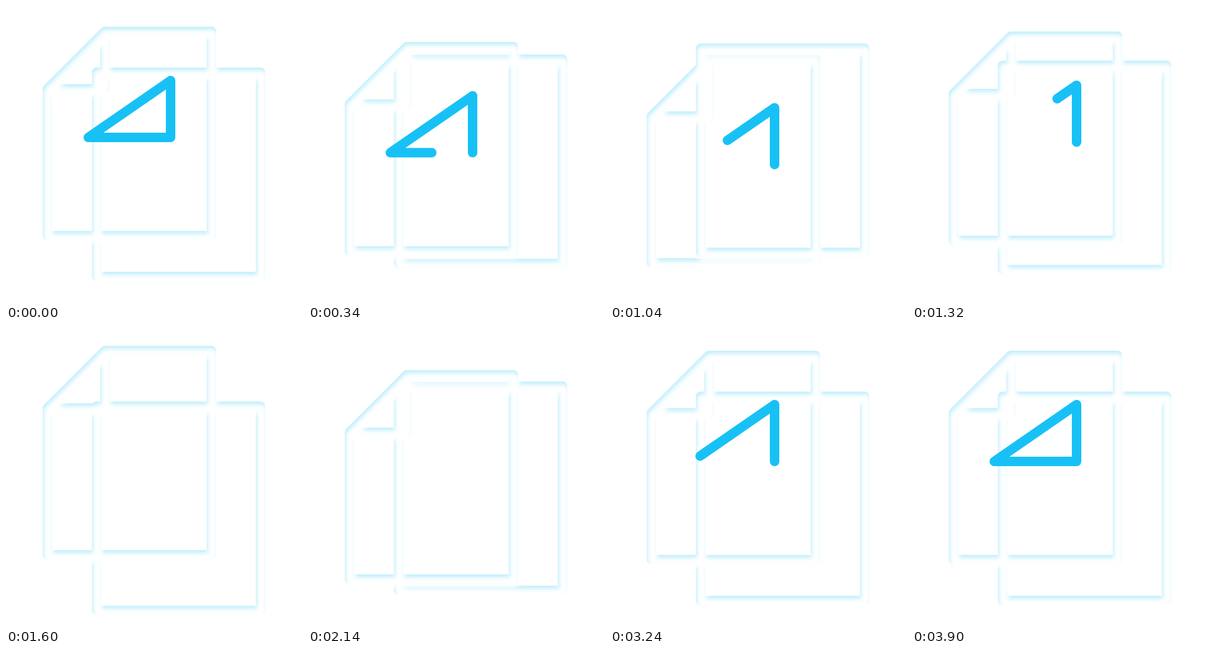
Animation of 500x500 px, one loop 4 s. Source, as an HTML page:

```html
<!DOCTYPE html>
<html lang="en">
<head>
<meta charset="utf-8">
<title>Pages</title>
<style>
  html, body { margin: 0; width: 100%; height: 100%; overflow: hidden; background: #fff; }
  svg { display: block; width: 100%; height: 100%; }
  path { fill: none; stroke-width: 16; stroke-linecap: round; stroke-linejoin: round; }
</style>
</head>
<body>
<svg viewBox="0 0 500 500">
  <defs>
    <filter id="inset" filterUnits="userSpaceOnUse" x="0" y="0" width="500" height="500" color-interpolation-filters="sRGB">
      <feComponentTransfer in="SourceAlpha">
        <feFuncA type="table" tableValues="1 0"/>
      </feComponentTransfer>
      <feOffset dx="2" dy="4.5"/>
      <feGaussianBlur stdDeviation="3.5" result="shade"/>
      <feFlood flood-color="#18c1f8" flood-opacity=".27"/>
      <feComposite in2="shade" operator="in"/>
      <feComposite in2="SourceAlpha" operator="in" result="inner"/>
      <feMerge>
        <feMergeNode in="SourceGraphic"/>
        <feMergeNode in="inner"/>
      </feMerge>
    </filter>
  </defs>
  <g filter="url(#inset)" stroke="#fff">
    <path id="back" d="M153 112H430V457H153Z"/>
    <path id="front" d="M70 388V140L167 43H347V388ZM167 43V140H70"/>
  </g>
  <path id="mark" d="M278 222V126L139 222Z" pathLength="1" stroke="#18c1f5"/>
</svg>
<script>
  const [back, front, mark] = ["back", "front", "mark"].map(id => document.getElementById(id));
  const LOOP = 4000, STEP = 20, LAST = 3900;

  // Keys are [time, value] pairs joined by straight lines.
  const frontKeys = [[0, 0], [885, 67], [1496, -16], [2168, 34.8], [2720, 0]];
  const backKeys = [[0, 0], [885, -57], [1596, 17], [2168, -18.7], [2720, 0]];
  const eraseKeys = [[0, 1], [1990, 0]];
  const drawKeys = [[2168, 0], [3908, 1]];
  const HIDE = 1510;

  function valueAt(keys, t) {
    for (let i = 1; i < keys.length; i++) {
      const [t0, v0] = keys[i - 1], [t1, v1] = keys[i];
      if (t <= t1) return v0 + (v1 - v0) * Math.max(0, t - t0) / (t1 - t0);
    }
    return keys[keys.length - 1][1];
  }

  const shift = (el, y) => el.setAttribute("transform", `translate(0 ${y.toFixed(2)})`);

  function render(t) {
    const frontY = valueAt(frontKeys, t);
    shift(front, frontY);
    shift(mark, frontY);
    shift(back, valueAt(backKeys, t));

    const drawn = t < HIDE ? valueAt(eraseKeys, t) : valueAt(drawKeys, t);
    mark.setAttribute("visibility", drawn > 0 ? "visible" : "hidden");
    mark.setAttribute("stroke-dasharray", drawn < 1 ? `${drawn} 2` : "none");
  }

  const start = performance.now();
  function tick() {
    const t = (performance.now() - start) % LOOP;
    render(Math.min(LAST, Math.floor(t / STEP) * STEP));
    requestAnimationFrame(tick);
  }
  tick();
</script>
</body>
</html>
```
